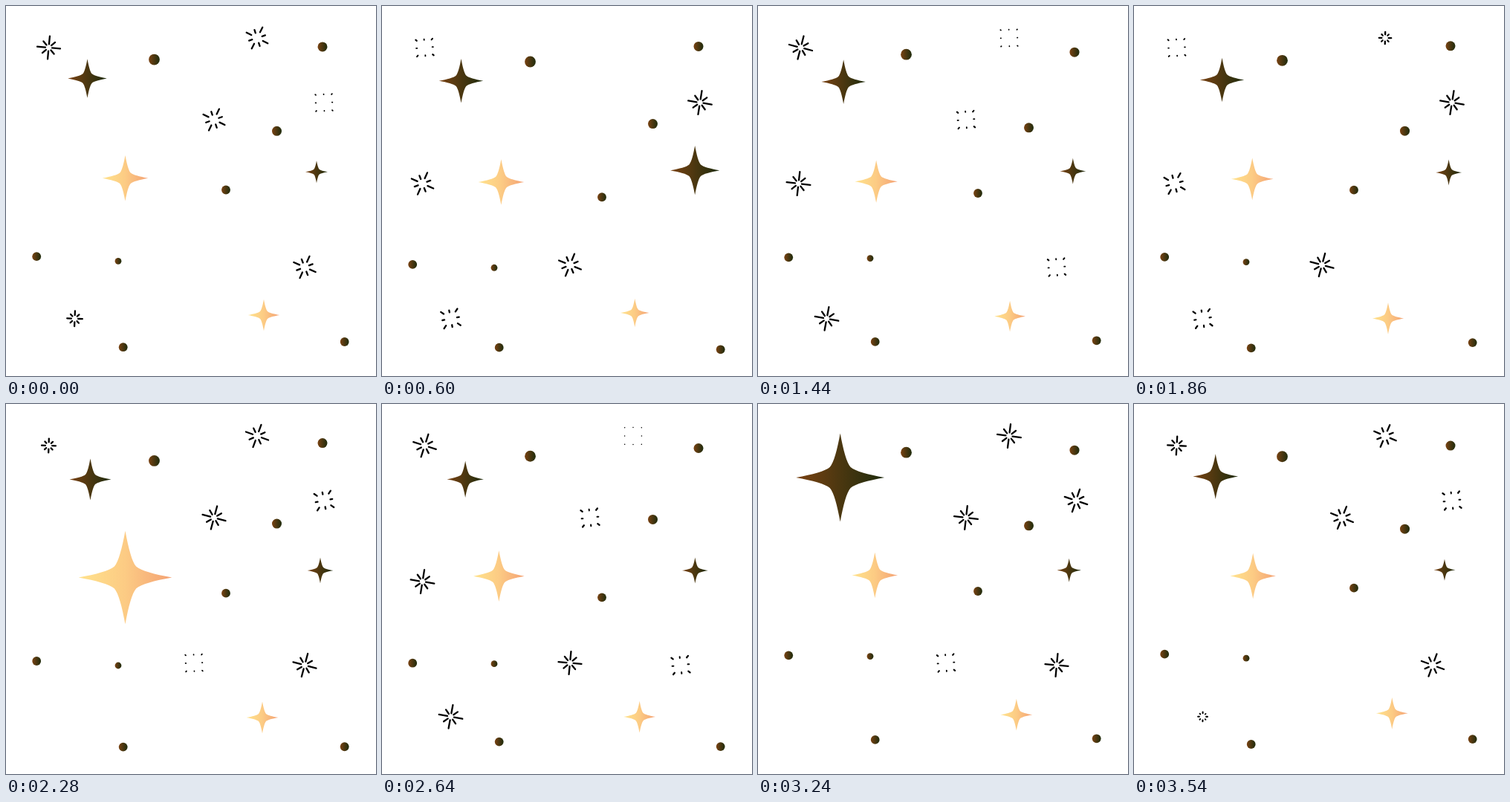
These frames come from a looping animation (498 by 498 pixels, 3600 ms). An HTML page with a canvas:

```html
<!DOCTYPE html>
<html lang="en">
<head>
<meta charset="utf-8">
<title>Sparkles</title>
<style>
html, body { margin: 0; width: 100%; height: 100%; overflow: hidden; background: #fff; }
canvas { display: block; width: 498px; height: 498px; }
</style>
</head>
<body>
<canvas id="stage" width="498" height="498"></canvas>
<script>
const ctx = document.getElementById('stage').getContext('2d');
const STEP = 60, STEPS = 60, TAU = Math.PI * 2;
const GOLD = ['#ffe28c', '#fccb84', '#f4a274'];
const DARK = ['#7a4212', '#4b3710', '#1e2b0c'];

// x, middle y, signed swing, radius, time of the extreme in steps
const dots = [
  [199.5, 70.5, 6.3, 7.4, 6.3],
  [426, 57.8, -6.3, 6.5, 5.2],
  [364.5, 161.8, 6.5, 6.5, 0],
  [296, 254, -6.5, 5.9, 0],
  [41.2, 342.7, 6.2, 5.9, 12.8],
  [151, 345.9, 6.4, 4.4, 9.5],
  [157.7, 456.3, 6.3, 5.9, 5.2],
  [455.7, 456.1, 6.3, 5.9, 10.9]
];

// Steps at which the drifting stars pass their points
const keys = [0, 10, 18, 31, 38, 49];
const stars = [
  { r: 29.8, peak: 53, fill: DARK,
    x: [109.5, 106.5, 111, 118.5, 113.5, 111.5], y: [97.5, 100.8, 104, 99.5, 101.5, 100.5] },
  { r: 30.8, peak: 38.5, fill: GOLD,
    x: [160.5, 160.4, 159.4, 159.2, 160.5, 155.4], y: [231.8, 237, 238.8, 232.8, 233.5, 230.3] },
  { r: 17.5, peak: 8.2, fill: DARK,
    x: [418, 421.2, 423.6, 423.6, 423, 420], y: [223.2, 221.2, 221, 224, 224, 224] },
  { r: 21.4, peak: 17.7, fill: GOLD,
    x: [347, 340.3, 337.5, 342, 345, 347.5], y: [416, 413, 415.2, 420.5, 422, 419.8] }
];

// Centre, then the three starts in steps
const bursts = [
  [57.5, 56, 17.2, 36.2, 56.5],
  [338, 43, 9.9, 29.5, 49.7],
  [280, 153, 10.5, 31, 50],
  [428, 130, 5, 26, 46],
  [54.5, 239, 0.5, 20, 39],
  [253, 348.5, 1, 24, 40.5],
  [92.5, 420.8, 18.5, 38.5, 58],
  [402, 351.5, 10.5, 31, 50.5]
];

const mod = (a, n) => ((a % n) + n) % n;
const clamp = v => Math.max(0, Math.min(1, v));
const smooth = v => { v = clamp(v); return v * v * (3 - 2 * v); };

// Closed smooth curve through the values at the key times
function drift(v, t) {
  const n = keys.length;
  const time = i => keys[mod(i, n)] + STEPS * Math.floor(i / n);
  const val = i => v[mod(i, n)];
  const slope = i => (val(i + 1) - val(i - 1)) / (time(i + 1) - time(i - 1));
  let i = n - 1;
  while (keys[i] > t) i--;
  const h = time(i + 1) - time(i), u = (t - time(i)) / h, s = smooth(u);
  return val(i) * (1 - s) + val(i + 1) * s
    + h * u * (1 - u) * ((1 - u) * slope(i) - u * slope(i + 1));
}

// Dip, swell to double size, dip, settle
const pulseKeys = [[-19, 1], [-9, 0.83], [0, 2.05], [8, 0.83], [14.3, 1]];
function pulse(d) {
  if (d <= -19) return 1;
  for (let i = 1; i < pulseKeys.length; i++) {
    const [a, p] = pulseKeys[i - 1], [b, q] = pulseKeys[i];
    if (d < b) return p + (q - p) * smooth((d - a) / (b - a));
  }
  return 1;
}

function gradient(colors, r) {
  const g = ctx.createLinearGradient(-r, 0, r, 0);
  colors.forEach((c, i) => g.addColorStop(i / 2, c));
  return g;
}

const quarter = 'C.07-.62 .145-.335 .235-.235 C.335-.145 .62-.07 1 0';
const starPath = new Path2D();
for (let i = 0; i < 4; i++) {
  starPath.addPath(new Path2D('M0 0L0-1' + quarter + 'Z'), new DOMMatrix().rotate(i * 90));
}
// Covers the seams between the quarters
starPath.addPath(new Path2D('M-.9 0L0-.02L.9 0L0 .02ZM0-.9L.02 0L0 .9L-.02 0Z'));

function drawDot([x, mid, swing, r, top], t) {
  ctx.save();
  ctx.translate(x, mid + swing * Math.cos((t - top) / 30 * TAU));
  ctx.fillStyle = gradient(DARK, r);
  ctx.beginPath();
  ctx.arc(0, 0, r, 0, TAU);
  ctx.fill();
  ctx.restore();
}

function drawStar(s, t) {
  const size = s.r * pulse(mod(t - s.peak + 30, STEPS) - 30);
  ctx.save();
  ctx.translate(drift(s.x, t), drift(s.y, t));
  ctx.scale(size, size);
  ctx.fillStyle = gradient(s.fill, 1);
  ctx.fill(starPath);
  ctx.restore();
}

function drawBurst([x, y, ...starts], t) {
  const age = Math.min(...starts.map(s => mod(t - s, STEPS)));
  if (age < 0.4 || age > 14.5) return;
  const head = smooth(age / 4);
  const tail = Math.pow(clamp((age - 6) / 8.5), 1.5);
  const turn = Math.pow(age / 14.5, 1.5) * TAU / 8;
  ctx.save();
  ctx.translate(x, y);
  ctx.rotate(turn);
  ctx.lineCap = 'round';
  ctx.strokeStyle = '#000';
  for (let i = 0; i < 8; i++) {
    const span = i % 2 ? 6.8 : 11.4;
    const from = 4.6 + span * tail, to = 4.6 + span * head;
    ctx.lineWidth = Math.min(2.3, 1.5 + (to - from) * 0.3);
    ctx.beginPath();
    ctx.moveTo(0, -from);
    ctx.lineTo(0, -to - 0.01);
    ctx.stroke();
    ctx.rotate(TAU / 8);
  }
  ctx.restore();
}

function draw(t) {
  ctx.fillStyle = '#fff';
  ctx.fillRect(0, 0, 498, 498);
  dots.forEach(d => drawDot(d, t));
  bursts.forEach(b => drawBurst(b, t));
  stars.forEach(s => drawStar(s, t));
}

const begin = performance.now();
function tick() {
  draw(Math.floor((performance.now() - begin) / STEP) % STEPS);
  requestAnimationFrame(tick);
}
tick();
</script>
</body>
</html>
```
